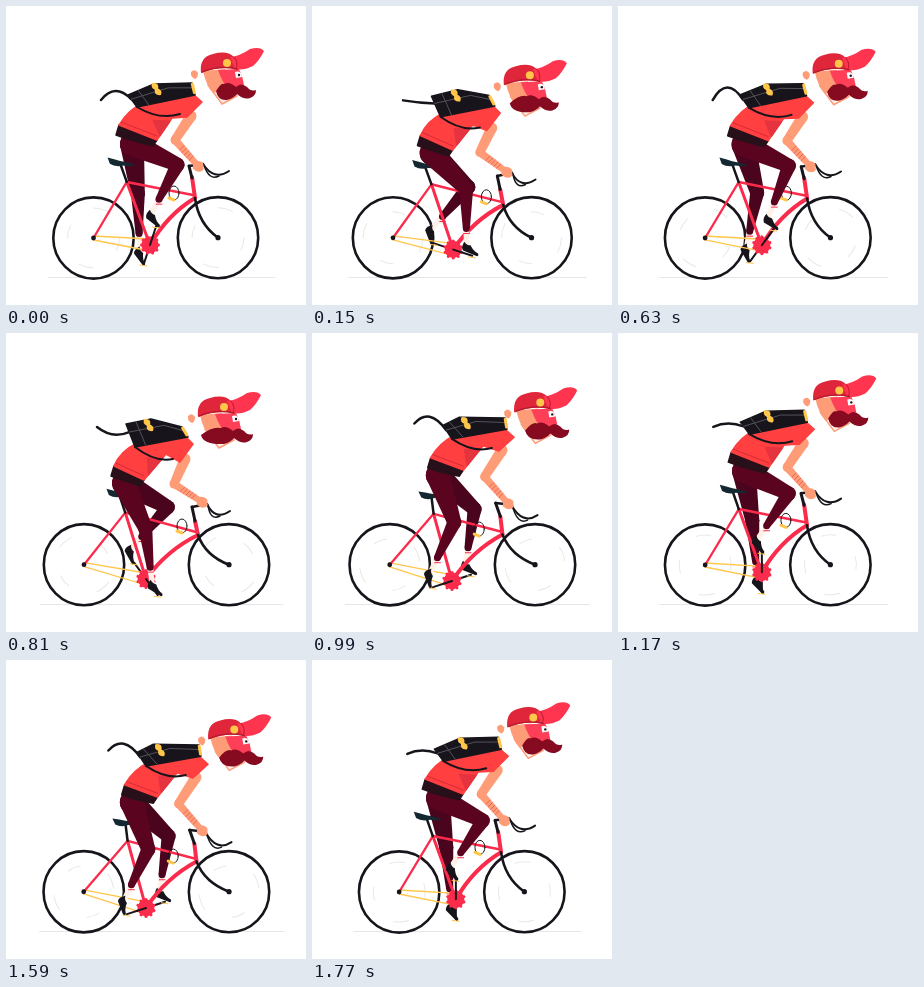
An HTML page with a canvas for the animation above (1800 ms loop, 300x299 px).

```html
<!DOCTYPE html>
<html lang="en">
<head>
<meta charset="utf-8">
<title>Cyclist</title>
<style>
html, body { margin: 0; width: 100%; height: 100%; overflow: hidden; background: #fff; }
canvas { display: block; }
</style>
</head>
<body>
<canvas id="stage" width="300" height="299"></canvas>
<script>
const g = document.getElementById('stage').getContext('2d');
const RED = '#fb2b4c', SHIRT = '#ff3f40', CAP = '#e0263a', BLACK = '#17151b',
  MAROON = '#5a0420', GOLD = '#ffc64a', SKIN = '#ff9c78', PALE = '#fff0e8';
const TAU = Math.PI * 2, CYCLE = 600, STEP = 30;
let weights = [1, 0, 0];

// Periodic spline through the tall, crouched and stretched poses.
function spline(a, b, c, p) {
  const mb = (c - a) / 330, mc = (a - b) / 390;
  const [t0, t1, v0, v1, m0, m1] = p < 210 ? [0, 210, a, b, 0, mb]
    : p < 330 ? [210, 330, b, c, mb, mc] : [330, CYCLE, c, a, mc, 0];
  const d = t1 - t0, h = (p - t0) / d, q = 1 - h;
  return v0 * q * q * (1 + 2 * h) + m0 * d * h * q * q
    + v1 * h * h * (3 - 2 * h) - m1 * d * h * h * q;
}
const mix = (a, b, c) => a * weights[0] + b * weights[1] + c * weights[2];
const at = (ax, ay, bx, by, cx, cy) => [mix(ax, bx, cx), mix(ay, by, cy)];
const add = (p, x, y) => [p[0] + x, p[1] + y];
const lerp = (p, q, k) => [p[0] + (q[0] - p[0]) * k, p[1] + (q[1] - p[1]) * k];

function paint(path, fill, stroke, width = 1) {
  if (fill) { g.fillStyle = fill; g.fill(path); }
  if (stroke) { g.strokeStyle = stroke; g.lineWidth = width; g.stroke(path); }
}
function line(color, width, ...pts) {
  const path = new Path2D();
  pts.forEach(p => path.lineTo(...p));
  paint(path, null, color, width);
}
function curve(color, width, a, b, c) {
  const path = new Path2D();
  path.moveTo(...a);
  path.quadraticCurveTo(...b, ...c);
  paint(path, null, color, width);
}
function poly(fill, ...pts) {
  const path = new Path2D();
  pts.forEach(p => path.lineTo(...p));
  path.closePath();
  paint(path, fill, fill, 1.5);
}
const shape = (d, fill, stroke, width) => paint(new Path2D(d), fill, stroke, width);
function oval([x, y], rx, ry, fill, stroke, width) {
  const path = new Path2D();
  path.ellipse(x, y, rx, ry, 0, 0, TAU);
  paint(path, fill, stroke, width);
}
const dot = (p, r, fill) => oval(p, r, r, fill);

function limb(p, r, q, s, fill) {
  const a = Math.atan2(q[1] - p[1], q[0] - p[0]) + Math.PI / 2;
  const x = Math.cos(a), y = Math.sin(a);
  const path = new Path2D();
  path.lineTo(p[0] + x * r, p[1] + y * r);
  path.lineTo(q[0] + x * s, q[1] + y * s);
  path.lineTo(q[0] - x * s, q[1] - y * s);
  path.lineTo(p[0] - x * r, p[1] - y * r);
  paint(path, fill);
  dot(p, r, fill);
  dot(q, s, fill);
}
function placed(p, angle, draw) {
  g.save();
  g.translate(...p);
  g.rotate(angle);
  draw();
  g.restore();
}

function wheel(p, turn) {
  oval(p, 40.2, 40.6, null, BLACK, 2.6);
  placed(p, turn, () => {
    for (let i = 0; i < 4; i++) {
      const path = new Path2D(), a = i * TAU / 4;
      path.arc(0, 0, i % 2 ? 30 : 26, a, a + 0.5);
      paint(path, null, '#e8e8e8', 1);
    }
  });
}

function leg(hip, crank, angle, fill) {
  const tilt = (38 - 25 * Math.sin(angle)) * Math.PI / 180;
  const pedal = add(crank, 20 * Math.sin(angle), -20 * Math.cos(angle));
  const ankle = add(pedal, -6 * Math.cos(tilt), -6 * Math.sin(tilt) - 9);
  const thigh = 50, shin = 56;
  const dx = ankle[0] - hip[0], dy = ankle[1] - hip[1];
  const d = Math.min(Math.hypot(dx, dy), thigh + shin - 0.1);
  const bend = Math.acos((thigh ** 2 + d * d - shin ** 2) / (2 * thigh * d));
  const dir = Math.atan2(dy, dx) - bend;
  const knee = add(hip, thigh * Math.cos(dir), thigh * Math.sin(dir));
  const cuff = lerp(knee, ankle, 0.7);
  line(BLACK, 2, crank, pedal);
  limb(cuff, 3, ankle, 2.5, PALE);
  line(RED, 1, add(cuff, -3, 5), add(cuff, 3, 5));
  limb(hip, 12, knee, 7, fill);
  limb(knee, 7, cuff, 3.5, fill);
  placed(ankle, tilt, () =>
    shape('M-3-3Q0 0 4-1Q8 4 13 5Q15 7 13 8L-2 6Q-5 3-3-3Z', BLACK));
  line(GOLD, 1, add(pedal, -4, 1), add(pedal, 3, 2));
}

function bike(rear, front, crank) {
  const seat = at(116, 163, 115, 166, 118, 168);
  const head = at(186, 171, 189, 188, 189, 187);
  const crown = at(189, 192, 192, 202, 191, 204);
  const saddle = at(114, 157, 113, 161, 120, 164);
  const joint = lerp(seat, crank, 0.17);

  line(GOLD, 1.3, add(rear, 0, -2), add(crank, 0, -6));
  line(GOLD, 1.3, add(rear, 0, 2), add(crank, 0, 6));
  line(RED, 2.3, joint, rear);
  line(RED, 3, joint, crank);
  line(RED, 2.5, joint, add(crown, -2, -3));
  curve(RED, 4, crown, add(lerp(crown, crank, 0.5), -5, -7), crank);
  line(RED, 4, head, crown);
  curve(BLACK, 2.6, crown, add(lerp(crown, front, 0.5), -8, 6), front);
  dot(front, 2.6, BLACK);
  dot(rear, 2.4, BLACK);
  line(BLACK, 2.5, joint, saddle);
  placed(saddle, mix(0.12, 0.1, 0), () =>
    shape('M-13-4Q-6-3 0-2Q8-2 15 0Q15 2 4 2Q-4 5-10 2Z', '#142832'));
  const cable = at(168, 187, 176, 193, 168, 198);
  oval(cable, 5, 7, null, BLACK, 1);
  line(GOLD, 3, add(cable, -5, 5), add(cable, 0, 7));
}

function gear(crank, turn) {
  placed(crank, turn, () => {
    for (let i = 0; i < 10; i++) {
      g.rotate(TAU / 10);
      line(RED, 3, [0, 0], [8.5, 0]);
    }
    dot([0, 0], 8.5, RED);
  });
}

function bars() {
  const stem = at(183, 160, 186, 174, 184, 173);
  const head = at(186, 172, 189, 188, 189, 187);
  const tip = at(223, 165, 224, 178, 226, 186);
  const grip = at(197, 158, 201, 171, 200, 175);
  line(BLACK, 3, stem, head);
  line(BLACK, 2.5, stem, grip);
  curve(BLACK, 2, grip, add(tip, -15, 10), tip);
  curve(BLACK, 1.5, add(grip, 1, 1), add(tip, -20, 10), add(tip, -10, 5));
}

function tail(base, phase) {
  const tip = at(95, 94, 91, 94, 103, 90);
  const lift = 8 + 18 * Math.cos((phase - 50) / 300 * TAU);
  curve(BLACK, 2.5, tip, add(lerp(tip, base, 0.5), -1, -lift), base);
}

function torso(phase) {
  const waist = at(113, 119, 108, 133, 119, 127);
  const back = at(132, 86, 121, 101, 138, 93);
  const neck = at(187, 88, 179, 103, 192, 98);
  const sleeve = at(196, 96, 187, 111, 202, 107);
  const cuff = at(181, 111, 174, 129, 187, 121);
  const armpit = at(166, 112, 160, 121, 171, 114);
  const belly = at(151, 134, 138, 147, 150, 139);
  poly('#28101a', waist, belly, add(belly, -4, 6), add(waist, 8, 14), add(waist, -3, 10));
  const shirt = new Path2D();
  shirt.moveTo(...waist);
  shirt.quadraticCurveTo(...back, ...neck);
  [sleeve, cuff, armpit, belly].forEach(p => shirt.lineTo(...p));
  shirt.closePath();
  paint(shirt, SHIRT, SHIRT, 1.5);
  poly('#e53340', lerp(armpit, belly, 0.15), lerp(armpit, belly, 0.8),
    lerp(armpit, waist, 0.35));
  line('#d92938', 1, add(waist, 2, -3), add(belly, 0, -4));

  const b1 = at(122, 89, 120, 91, 132, 93);
  const b2 = at(148, 78, 145, 86, 147, 86);
  const b3 = at(186, 77, 176, 94, 193, 88);
  const b4 = at(189, 89, 182, 104, 195, 99);
  const b5 = at(131, 101, 129, 114, 141, 108);
  tail(lerp(b1, b5, 0.35), phase);
  poly(BLACK, b1, b2, b3, b4, b5);
  line('#55515a', 1, lerp(b1, b5, 0.35), lerp(b2, b4, 0.35), lerp(b3, b4, 0.4));
  line('#55515a', 1, lerp(b1, b2, 0.4), lerp(b5, b4, 0.2));
  const clasp = at(150, 83, 142, 92, 153, 92);
  placed(clasp, 0.2, () => shape('M-5-5Q2-7 2-1Q7 0 6 5Q-1 7-1 1Q-6 0-5-5Z', GOLD));
  line(GOLD, 3, lerp(b3, b4, 0.1), lerp(b3, b4, 0.8));
  curve(BLACK, 2, b5, add(lerp(b5, cuff, 0.45), 0, 9), add(cuff, -7, -3));
}

function arm() {
  const shoulder = at(185, 110, 179, 126, 190, 120);
  const elbow = at(169, 134, 168, 151, 173, 147);
  const hand = at(192, 160, 196, 169, 197, 173);
  limb(shoulder, 5.5, elbow, 4.5, SKIN);
  limb(elbow, 4, hand, 3, SKIN);
  for (let i = 0; i < 5; i++) {
    const p = lerp(elbow, hand, 0.3 + i * 0.1);
    line('#e7554f', 0.8, add(p, -2, 2), add(p, 2, -2));
  }
  placed(hand, 0.1, () => shape('M-5-4Q1-7 5-3L6 3Q3 7-2 5L-5 3Z', SKIN));
}

function head() {
  const pos = at(221, 57, 218, 74, 229, 73);
  placed(pos, 0, () => {
    shape('M-19 22L-5 41L10 33L8 24Z', PALE, SKIN, 1.5);
    shape('M-24 8L-2 6L0 26L-14 30Q-21 22-24 8Z', SKIN);
    shape('M-9 7L12 6Q16 14 17 22L2 27Q-5 19-9 7Z', '#ff3f58');
    shape('M8 9Q14 7 15 14L9 15Z', '#fff');
    dot([12, 12], 1.2, BLACK);
    shape('M-36 9Q-32 5-29 10Q-29 15-32 16Q-37 14-36 9Z', SKIN);
    shape('M-26 10Q-28-6-14-9Q0-13 7-6L10 6Q-8 3-26 10Z', CAP);
    shape('M3-6Q13-7 23-14Q33-17 37-12Q32-2 26 3Q16 8 8 6Z', '#ff3550');
    shape('M7-6Q12 0 9 6', null, '#b81a2e', 1);
    shape('M-25 9Q-8 2 10 6', null, '#b81a2e', 1.5);
    dot([0, 0], 4, GOLD);
    const left = mix(-11, -23, -17);
    const path = new Path2D(`M9 24Q2 18-3 21Q${left / 2} 19 ${left} 28`
      + `Q${left + 2} 38 0 37Q7 35 10 31Q17 37 23 35Q29 33 29 27`
      + 'Q24 29 20 24Q14 19 9 24Z');
    paint(path, '#860a20');
  });
}

function draw(now) {
  const phase = Math.floor(now % 1800 / STEP) * STEP % CYCLE;
  weights = [spline(1, 0, 0, phase), spline(0, 1, 0, phase), spline(0, 0, 1, phase)];
  const turn = phase / CYCLE * TAU;
  const angle = turn + TAU / 20;
  const rear = at(87.5, 232, 78, 231.7, 75.3, 231.7);
  const front = at(212, 231.7, 223, 231.7, 225.8, 231.7);
  const crank = at(144, 239, 140, 246, 139, 250);
  const hip = at(126, 138, 118, 150, 125, 144);

  g.fillStyle = '#fff';
  g.fillRect(0, 0, 300, 299);
  g.lineCap = g.lineJoin = 'round';
  line('#e6e6e6', 1, at(42, 271.5, 34, 271.5, 31, 271.5), at(269, 271.5, 277, 271.5, 280, 271.5));
  wheel(rear, turn);
  wheel(front, turn);
  leg(hip, crank, angle + Math.PI, '#4a041d');
  bike(rear, front, crank);
  gear(crank, turn);
  leg(hip, crank, angle, MAROON);
  bars();
  arm();
  head();
  torso(phase);
}

const start = performance.now();
(function tick() {
  draw(performance.now() - start);
  requestAnimationFrame(tick);
})();
</script>
</body>
</html>
```
